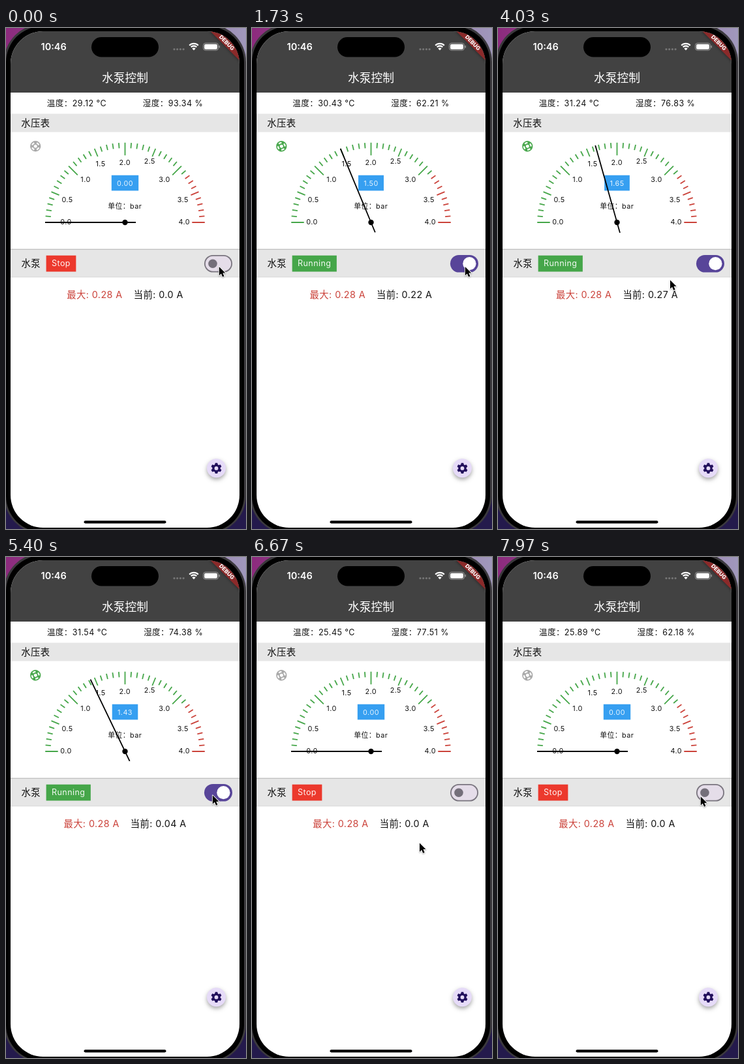
Animation of 368 by 768 pixels, one loop 8000 ms. Source, as an HTML page with a canvas:

```html
<!DOCTYPE html>
<html lang="zh">
<head>
<meta charset="utf-8">
<title>水泵控制</title>
<style>
html, body { margin: 0; width: 100%; height: 100%; overflow: hidden; background: #000; }
canvas { display: block; width: 368px; height: 768px; }
</style>
</head>
<body>
<canvas id="stage"></canvas>
<script>
const W = 368, H = 768, LOOP = 8000;
const canvas = document.getElementById('stage');
const ctx = canvas.getContext('2d');
const dpr = window.devicePixelRatio || 1;
canvas.width = W * dpr;
canvas.height = H * dpr;

const FONT = 'Inter, "Noto Sans CJK SC", "Noto Sans CJK", sans-serif';
const LARGE = 14.3, MEDIUM = 12.5, SMALL = 10.8, TRACKING = 0.45;
const GREEN = '#45a649', RED = '#cb423a', BLUE = '#369ff1', GRAY = '#e6e6e6', INK = '#111';
const SCREEN = { x: 7, y: 5, w: 351, h: 761 };
const PIVOT = { x: 182.5, y: 298 };

// Readings: [start time, value...]
const climate = [
  [0, '29.12', '93.34'], [1700, '30.43', '62.21'], [2930, '26.59', '86.47'],
  [3770, '31.24', '76.83'], [5130, '31.54', '74.38'], [6200, '25.45', '77.51'],
  [7370, '25.89', '62.18']
];
const pressure = [
  [0, 0], [400, 1.56], [1430, 1.5], [2570, 1.45], [3630, 1.65], [4530, 1.43], [5930, 0]
];
const current = [
  [0, '0.0'], [470, '0.25'], [1270, '0.22'], [2200, '0.27'], [5270, '0.04'], [5930, '0.0']
];
// Pointer path: time, x, y
const pointer = [
  [0, 326.8, 366], [3170, 326.8, 366], [3300, 264, 386.5], [4030, 264, 386.5],
  [4230, 316.8, 365.3], [6500, 316.8, 365.3], [6670, 257, 438.5], [6950, 232, 466],
  [7330, 240, 452], [7900, 310.8, 367.3], [8000, 310.8, 367.3]
];

const mix = (a, b, k) => a + (b - a) * k;
const clamp = k => Math.max(0, Math.min(1, k));
const smooth = k => { k = clamp(k); return k * k * (3 - 2 * k); };
const mixColor = (a, b, k) => `rgb(${a.map((v, i) => Math.round(mix(v, b[i], k)))})`;
const at = (list, t) => list.filter(row => row[0] <= t).pop();

function pointerAt(t) {
  const i = Math.max(1, pointer.findIndex(p => p[0] > t));
  const a = pointer[i - 1], b = pointer[i];
  const k = smooth((t - a[0]) / (b[0] - a[0]));
  return [mix(a[1], b[1], k), mix(a[2], b[2], k)];
}

function rect(x, y, w, h, color) {
  ctx.fillStyle = color;
  ctx.fillRect(x, y, w, h);
}

function roundPath(x, y, w, h, r) {
  ctx.beginPath();
  ctx.roundRect(x, y, w, h, r);
}

function pill(x, y, w, h, r, color) {
  roundPath(x, y, w, h, r);
  ctx.fillStyle = color;
  ctx.fill();
}

function disc(x, y, r, color) {
  ctx.beginPath();
  ctx.arc(x, y, r, 0, Math.PI * 2);
  ctx.fillStyle = color;
  ctx.fill();
}

function line(x1, y1, x2, y2, color, width) {
  ctx.beginPath();
  ctx.moveTo(x1, y1);
  ctx.lineTo(x2, y2);
  ctx.strokeStyle = color;
  ctx.lineWidth = width;
  ctx.stroke();
}

function setFont(size, weight = 400, tracking = TRACKING) {
  ctx.font = `${weight} ${size}px ${FONT}`;
  ctx.letterSpacing = `${tracking}px`;
}

function text(str, x, y, size, color, align = 'left', weight = 400, tracking = TRACKING) {
  setFont(size, weight, tracking);
  ctx.textAlign = align;
  ctx.fillStyle = color;
  ctx.fillText(str, x, y);
}

function widthOf(str, size) {
  setFont(size);
  return ctx.measureText(str).width;
}

function backdrop() {
  const sky = ctx.createLinearGradient(0, 0, W, 0);
  sky.addColorStop(0, '#8c2a7d');
  sky.addColorStop(1, '#a098bc');
  rect(0, 0, W, H / 2, sky);
  rect(0, H / 2, W, H / 2, '#241a4c');
  pill(-3, -6, 371, 781, 58, '#3b393d');
  pill(0, -2.5, 365, 775, 55, '#000');
}

function statusBar() {
  text('10:46', 53.5, 34, 14.5, '#fff', 'left', 600, 0);
  pill(131, 14, 103, 30.5, 15.2, '#000');
  for (let i = 0; i < 4; i++) disc(258 + i * 4.7, 32.6, 1.6, '#747474');

  ctx.strokeStyle = '#fff';
  ctx.lineWidth = 2.3;
  for (const r of [6, 9.6]) {
    ctx.beginPath();
    ctx.arc(288, 33.5, r, -Math.PI * 0.75, -Math.PI * 0.25);
    ctx.stroke();
  }
  ctx.beginPath();
  ctx.moveTo(288, 34.2);
  ctx.arc(288, 34.2, 3.8, -Math.PI * 0.75, -Math.PI * 0.25);
  ctx.fillStyle = '#fff';
  ctx.fill();

  roundPath(302.5, 23.2, 23, 11, 3.5);
  ctx.strokeStyle = '#9a9a9a';
  ctx.lineWidth = 1;
  ctx.stroke();
  pill(304, 24.7, 20, 8, 2.2, '#fff');
  pill(326.6, 26.8, 1.4, 4, 0.7, '#9a9a9a');
}

function banner() {
  ctx.save();
  ctx.translate(SCREEN.x + SCREEN.w, 3);
  ctx.rotate(Math.PI / 4);
  ctx.shadowColor = 'rgba(0,0,0,.5)';
  ctx.shadowBlur = 5 * dpr;
  rect(-38, 22, 76, 11, '#8b2a2a');
  ctx.shadowColor = 'transparent';
  text('DEBUG', 0, 30.5, 8.4, '#fff', 'center', 800, 0);
  ctx.restore();
}

function climateRow(t) {
  const [, temp, hum] = at(climate, t);
  const left = `温度：${temp} °C`, right = `湿度：${hum} %`;
  const a = widthOf(left, MEDIUM), b = widthOf(right, MEDIUM);
  const gap = (SCREEN.w - a - b) / 3;
  text(left, SCREEN.x + gap, 119.8, MEDIUM, INK);
  text(right, SCREEN.x + gap * 2 + a, 119.8, MEDIUM, INK);
}

function buoy(color, angle) {
  ctx.save();
  ctx.translate(45.2, 181.3);
  ctx.rotate(angle);
  ctx.strokeStyle = color;
  const ring = (r, width, from = 0, to = Math.PI * 2) => {
    ctx.beginPath();
    ctx.arc(0, 0, r, from, to);
    ctx.lineWidth = width;
    ctx.stroke();
  };
  ring(7.4, 1.6);
  ring(3.3, 1.6);
  for (let i = 0; i < 4; i++) {
    const mid = i * Math.PI / 2;
    ring(5.4, 3, mid - 0.36, mid + 0.36);
  }
  ctx.restore();
}

function gauge(value) {
  for (let i = 0; i <= 40; i++) {
    const a = Math.PI * (1 + i / 40);
    const c = Math.cos(a), s = Math.sin(a);
    const length = i % 10 === 0 ? 19.5 : i % 5 === 0 ? 13 : 8.3;
    const inner = 122.3 - length;
    line(PIVOT.x + c * 122.3, PIVOT.y + s * 122.3, PIVOT.x + c * inner, PIVOT.y + s * inner,
      i < 32 ? GREEN : RED, 1.8);
  }
  const marks = [[92, 297], [94, 263.5], [122, 232.5], [145, 208.5], [182.3, 206.5],
    [220.3, 204.5], [243, 232.5], [271.3, 263.5], [273.3, 297]];
  marks.forEach(([x, y], i) => text((i / 2).toFixed(1), x, y + 3.8, SMALL, INK, 'center'));

  const label = value.toFixed(2);
  const w = widthOf(label, SMALL) + 16.6;
  rect(PIVOT.x - w / 2, 225.7, w, 23.7, BLUE);
  text(label, PIVOT.x, 241.8, SMALL, 'rgba(255,255,255,.88)', 'center');
  text('单位：bar', 182.3, 277.4, SMALL, INK, 'center');

  const a = Math.PI * (1 + value / 4);
  const c = Math.cos(a), s = Math.sin(a);
  line(PIVOT.x - c * 16.5, PIVOT.y - s * 16.5, PIVOT.x + c * 122.5, PIVOT.y + s * 122.5, '#000', 1.8);
  disc(PIVOT.x, PIVOT.y, 4.2, '#000');
}

function toggle(k) {
  pill(304, 348, 43, 26.5, 13.2, mixColor([121, 116, 126], [88, 69, 153], k));
  pill(305.8, 349.8, 39.4, 22.9, 11.4, mixColor([229, 221, 233], [88, 69, 153], k));
  disc(mix(317, 333.4, k), 361.2, mix(6.8, 10.1, k), mixColor([116, 111, 122], [255, 255, 255], k));
}

function pumpRow(running, k) {
  rect(SCREEN.x, 339, SCREEN.w, 43, GRAY);
  rect(SCREEN.x, 338.7, SCREEN.w, 1, '#b2b2b2');
  rect(SCREEN.x, 381.5, SCREEN.w, 0.8, '#d6d6d6');
  text('水泵', 23.5, 366.4, LARGE, INK);
  const label = running ? 'Running' : 'Stop';
  rect(61.6, 348.7, widthOf(label, MEDIUM) + 16.8, 24.8, running ? GREEN : '#ec392d');
  text(label, 70, 365.4, MEDIUM, 'rgba(255,255,255,.93)');
  toggle(k);
}

function currentRow(t) {
  const max = '最大: 0.28 A', now = `当前: ${at(current, t)[1]} A`;
  const a = widthOf(max, LARGE), b = widthOf(now, LARGE);
  const x = SCREEN.x + (SCREEN.w - a - b - 17) / 2;
  text(max, x, 414.3, LARGE, RED);
  text(now, x + a + 17, 414.3, LARGE, INK);
}

function settingsButton() {
  const color = '#e6dbf8', ink = '#22105c';
  ctx.save();
  ctx.shadowColor = 'rgba(0,0,0,.35)';
  ctx.shadowBlur = 6 * dpr;
  ctx.shadowOffsetY = 3 * dpr;
  disc(322.5, 674.7, 14.5, color);
  ctx.restore();

  ctx.save();
  ctx.translate(322.5, 674.9);
  disc(0, 0, 6.1, ink);
  for (let i = 0; i < 6; i++) {
    ctx.beginPath();
    ctx.moveTo(-2.5, -5);
    ctx.lineTo(-1.7, -8.2);
    ctx.lineTo(1.7, -8.2);
    ctx.lineTo(2.5, -5);
    ctx.fill();
    ctx.rotate(Math.PI / 3);
  }
  disc(0, 0, 2.9, color);
  ctx.restore();
}

function arrow([x, y]) {
  ctx.save();
  ctx.translate(x, y);
  ctx.scale(0.88, 0.88);
  ctx.beginPath();
  [[0, 0], [0, 15.2], [3.5, 12], [6, 17.6], [8.7, 16.4], [6.3, 10.9], [10.8, 10.7]]
    .forEach(p => ctx.lineTo(...p));
  ctx.closePath();
  ctx.lineJoin = 'round';
  ctx.strokeStyle = '#fff';
  ctx.lineWidth = 2;
  ctx.shadowColor = 'rgba(0,0,0,.3)';
  ctx.shadowBlur = 2 * dpr;
  ctx.shadowOffsetY = dpr;
  ctx.stroke();
  ctx.shadowColor = 'transparent';
  ctx.fillStyle = '#000';
  ctx.fill();
  ctx.restore();
}

function draw(t) {
  const started = t >= 230;
  const running = started && t < 5880;
  const k = t < 3000 ? smooth((t - 30) / 370) : 1 - smooth((t - 5740) / 290);
  ctx.setTransform(dpr, 0, 0, dpr, 0, 0);
  backdrop();

  ctx.save();
  roundPath(SCREEN.x, SCREEN.y, SCREEN.w, SCREEN.h, 50);
  ctx.clip();
  rect(0, 0, W, H, '#fff');
  rect(0, 0, W, 99, '#424242');
  statusBar();
  text('水泵控制', 182.5, 82.8, 17.8, '#fff', 'center', 300, 0);
  banner();
  climateRow(t);
  rect(SCREEN.x, 131.5, SCREEN.w, 28, GRAY);
  text('水压表', 23.3, 150.6, LARGE, INK);
  buoy(running ? GREEN : '#a8a8a8', started ? 0.38 : 0);
  gauge(at(pressure, t)[1]);
  pumpRow(running, k);
  currentRow(t);
  settingsButton();
  pill(119.5, 755.2, 126, 4.2, 2.1, '#000');
  ctx.restore();

  arrow(pointerAt(t));
}

const start = performance.now();
function frame() {
  draw((performance.now() - start) % LOOP);
  requestAnimationFrame(frame);
}
frame();
</script>
</body>
</html>
```
